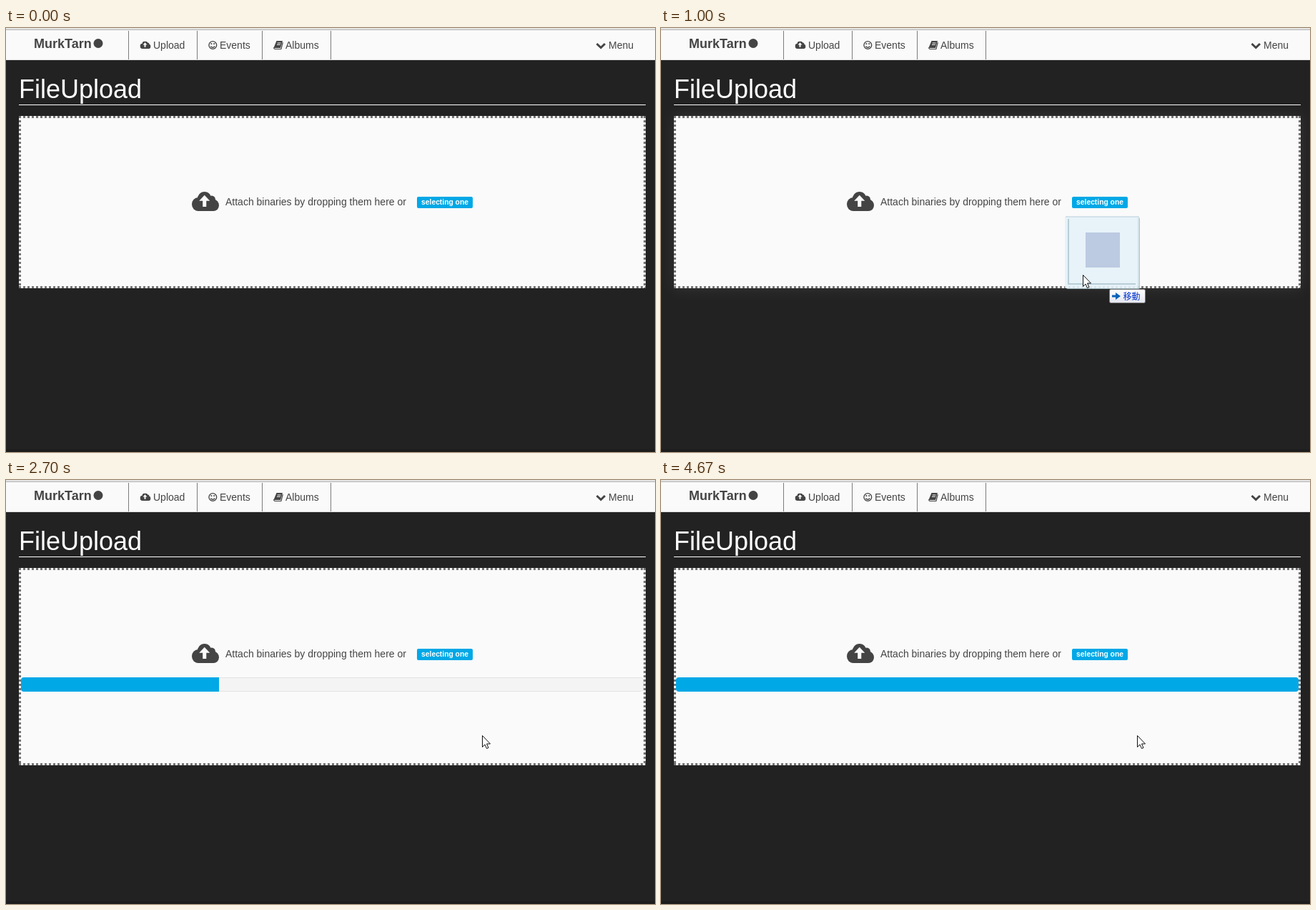
These frames come from a looping animation (908 px wide and 593 px high, 8 s). An HTML page:

```html
<!DOCTYPE html>
<html lang="en">
<head>
<meta charset="utf-8">
<title>File upload</title>
<style>
  html, body { margin: 0; width: 100%; height: 100%; overflow: hidden; background: #222; }
  svg { display: block; width: 908px; height: 593px; font: 14px Arial, "Liberation Sans", sans-serif; fill: #444; }
  .dots { fill: none; stroke: #747474; stroke-width: 3; stroke-dasharray: 3 3; }
  .icon { fill: none; stroke: #444; }
</style>
</head>
<body>
<svg viewBox="0 0 908 593">
  <defs>
    <symbol id="cloud" viewBox="0 256 1920 1280" preserveAspectRatio="none">
      <circle cx="448" cy="1088" r="448"/>
      <circle cx="896" cy="768" r="512"/>
      <circle cx="1408" cy="768" r="256"/>
      <circle cx="1536" cy="1152" r="384"/>
      <path d="M448 900H1536V1536H448z"/>
      <path fill="#fafafa" d="M896 480L1275 864H1024V1248H768V864H517z"/>
    </symbol>
    <linearGradient id="tipFill" x2="0" y2="1">
      <stop stop-color="#fff"/>
      <stop offset="1" stop-color="#e4e5f0"/>
    </linearGradient>
    <clipPath id="trackClip"><rect x="21" y="276" width="871" height="20" rx="4"/></clipPath>
    <filter id="blur" x="-10%" y="-30%" width="120%" height="160%"><feGaussianBlur stdDeviation="10"/></filter>
  </defs>

  <path fill="#222" d="M0 0H908V593H0z"/>
  <path fill="#1d1d1d" d="M0 589H908V593H0z"/>

  <!-- Navigation bar -->
  <path fill="#fafafa" d="M0 0H908V45H0z"/>
  <path fill="#e4e4e4" d="M0 0H908V2H0z"/>
  <path fill="#b4b4b4" d="M0 2H908V3H0z"/>
  <path fill="#dedede" d="M0 44H908V45H0z"/>
  <path class="icon" style="stroke:#7c7c7c" d="M171.5 4V44M267.5 4V44M358.5 4V44M454.5 4V44"/>
  <text x="39" y="28" font-size="18" font-weight="bold">MurkTarn</text>
  <circle cx="129" cy="21.500" r="6.500"/>
  <use href="#cloud" x="187.500" y="18.500" width="15" height="10.500"/>
  <text x="206" y="29">Upload</text>
  <g class="icon" stroke-width="1.300">
    <circle cx="289.300" cy="24" r="5.400"/>
    <path d="M286.400 25.500Q289.300 29 292.200 25.500"/>
    <path stroke-width="1.800" d="M286.500 22.200h1.800M290.300 22.200h1.800"/>
  </g>
  <text x="299" y="29">Events</text>
  <path d="M378.500 18H387L384 28H376Q374.500 28 375 26.500z"/>
  <path class="icon" stroke-width="1.200" d="M387.300 20.200L384.900 29.500H376.500Q374.500 29.300 374.800 27"/>
  <path stroke="#fafafa" fill="none" d="M379.700 21h4.800M379 23.300h4.800"/>
  <text x="391" y="29">Albums</text>
  <path class="icon" stroke-width="3" d="M826.500 22L832.300 27.500L838 22"/>
  <text x="843" y="29">Menu</text>

  <text x="18" y="98" font-size="36" fill="#fff">FileUpload</text>
  <path fill="#fff" d="M18 107H895V108H18z"/>

  <!-- Drop zone -->
  <rect id="glow" x="18" y="123" width="877" height="241" fill="#646464" opacity=".3" filter="url(#blur)"/>
  <rect id="zone" x="18" y="123" width="877" fill="#fafafa"/>
  <path id="border" class="dots"/>
  <use href="#cloud" x="260" y="229" width="38" height="27"/>
  <text x="307" y="248">Attach binaries by dropping them here or</text>
  <rect x="575" y="236" width="78" height="16" rx="2" fill="#00a8e6"/>
  <text x="614" y="247.300" font-size="10.300" font-weight="bold" fill="#fff" text-anchor="middle">selecting one</text>

  <g id="progress" clip-path="url(#trackClip)">
    <rect x="21.500" y="276.500" width="870" height="19" rx="3.500" fill="#f4f4f4" stroke="#e3e3e3"/>
    <rect id="fill" x="21" y="276" height="20" fill="#00a8e6"/>
  </g>

  <g id="pointer">
    <g id="ghost">
      <g opacity=".9">
        <rect x="-23" y="-80" width="103" height="100" rx="2" fill="#a9bfc8"/>
        <rect x="-25" y="-82" width="104" height="101" rx="2" fill="#e5f2f9"/>
        <path fill="none" stroke="#b3cad4" stroke-width="2" d="M-20 -78V13H74"/>
        <path fill="none" stroke="#d0e0e8" stroke-width="2" d="M-24 -81H78V18"/>
      </g>
      <rect x="4" y="-59" width="48" height="49" fill="#bccae2"/>
      <rect x="37.500" y="20.500" width="50" height="19" rx="2" fill="url(#tipFill)" stroke="#767676"/>
      <path fill="#0a62b8" d="M41 28.500H46V25L53 30L46 35V31.500H41z"/>
      <text x="56.500" y="34.500" font-size="12" fill="#03c" style="font-family:'Noto Sans CJK JP','Noto Sans CJK',sans-serif">移動</text>
    </g>
    <path fill="#fff" stroke="#111" d="M.5 .5V16.500L4 13L6.500 18.500L9 17.500L6.500 12H11.500z"/>
  </g>
</svg>
<script>
  const LOOP = 8000, START = 550, STEP = 4120 / 46;
  const DROP = 8, RELEASED = 10;
  // Knots are [step, value]
  const dragX = [[0, 364], [2, 477], [7, 666]];
  const dragY = [[0, 309], [2, 327], [7, 357]];
  const fillEnd = [[8, 40], [9, 60], [11, 68], [18, 195], [28, 367], [30, 434], [37, 595], [38, 612], [46, 892]];

  const $ = id => document.getElementById(id);
  const show = (id, on) => $(id).setAttribute('display', on ? 'inline' : 'none');

  function track(knots, n) {
    const i = knots.findIndex(k => k[0] >= n);
    if (i < 0) return knots[knots.length - 1][1];
    if (i === 0) return knots[0][1];
    const [n0, v0] = knots[i - 1], [n1, v1] = knots[i];
    return Math.round(v0 + (v1 - v0) * (n - n0) / (n1 - n0));
  }

  function draw(time) {
    const n = Math.floor((time % LOOP - START) / STEP + 0.1);
    const dragging = n >= 0 && n < DROP, dropped = n >= DROP;
    const height = dropped ? 276 : 241, bottom = 123 + height - 1.5;
    show('glow', dragging);
    show('ghost', dragging);
    show('progress', dropped);
    show('pointer', dragging || n >= RELEASED);
    $('zone').setAttribute('height', height);
    $('border').setAttribute('d',
      `M18 124.500H895M18 ${bottom}H895M19.500 123V${bottom + 1.5}M893.500 123V${bottom + 1.5}`);
    $('fill').setAttribute('width', track(fillEnd, n) - 21);
    $('pointer').setAttribute('transform', `translate(${track(dragX, n)} ${track(dragY, n)})`);
  }

  function frame() {
    draw(performance.now());
    requestAnimationFrame(frame);
  }
  frame();
</script>
</body>
</html>
```
